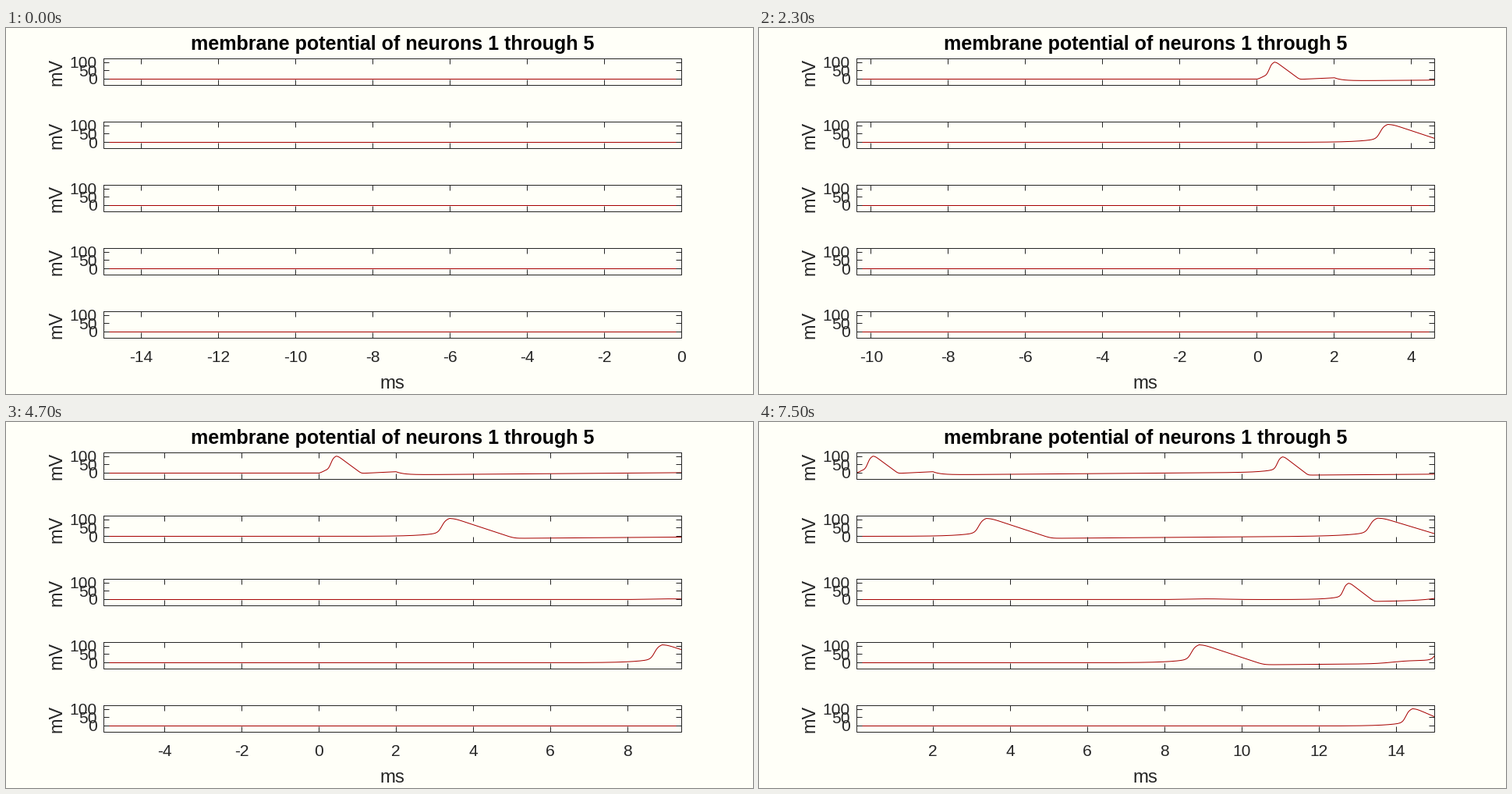
Animation, 958 px wide and 469 px high, one loop 7600 ms. Source, as a matplotlib script:

```python
import math

import numpy as np
import matplotlib.pyplot as plt
from matplotlib.animation import FuncAnimation

W, H, DPI = 958, 469, 64
FRAMES, INTERVAL = 76, 100
STEP, SPAN = 0.2, 14.97          # ms per frame, ms in view
LEFT, RIGHT = 125.5, 866.5
TOPS = [39.5 + 81 * i for i in range(5)]
HEIGHT, V_MAX, V_MIN = 34, 120, -40
X_SCALE = (RIGHT - LEFT) / SPAN
Y_SCALE = HEIGHT / (V_MAX - V_MIN)
TROUGH, RECOVERY = -12, 1.75     # mV, mV per ms
BG, INK, RED = "#fffff8", "#262626", "#a60000"
FONT = "Liberation Sans"


def soft_ramp(x, soft=.04):
    """Ramp from 1 down to 0 with rounded corners."""
    y = 1.07 - 1.12 * x
    return soft * (np.logaddexp(0, y / soft) - np.logaddexp(0, (y - 1) / soft))


def add_spike(v, t, peak, width):
    """Slow foot and steep upstroke, then repolarise and drift back."""
    u = t - peak
    top = 92 + 9.5 * width
    w = .025 + .015 * width
    foot = .32 * np.exp(np.minimum(u, 0) / (10 * w))
    upstroke = .69 * (1 + np.tanh((u + 4 * w) / (2 * w))) / 2
    before = v + (top - v) * (foot + upstroke)
    after = (TROUGH + (top - TROUGH) * soft_ramp(u / width)
             + RECOVERY * np.maximum(u - width, 0))
    return np.where(u < 0, before, after)


def stimulus(t):
    return np.where(t < 2, 9.5 * np.maximum(t, 0),
                    19 * np.exp(-np.maximum(t - 2, 0) / .2))


def bump(t, size, mid, width):
    return size * np.exp(-((t - mid) / width) ** 2)


# Spikes as (peak time, width) in ms
SPIKES = [
    [(.45, .68), (11.06, .69)],
    [(3.39, 1.75), (13.53, 1.95)],
    [(12.77, .69), (15.45, 1.75)],
    [(8.9, 1.75), (15.25, 1.75)],
    [(14.43, 1.3)],
]


def potential(n, t):
    v = np.zeros_like(t)
    for peak, width in SPIKES[n]:
        v = add_spike(v, t, peak, width)
    if n == 0:
        v = v * np.clip(t / .15, 0, 1) + stimulus(t)
    elif n == 2:
        v = v + bump(t, 4, 9.1, .7)
    elif n == 3:
        v = v + bump(t, 11, 14.3, .6)
    return v


def px(n):
    return n * 72 / DPI


def snap(p):
    return math.floor(p + 1e-6) + .5


fig = plt.figure(figsize=(W / DPI, H / DPI), dpi=DPI, facecolor=BG)
ax = fig.add_axes([0, 0, 1, 1])
ax.set(xlim=(0, W), ylim=(H, 0))
ax.axis("off")


def line(x, y, color=INK, z=3):
    return ax.plot(x, y, color=color, lw=px(1), zorder=z, snap=False,
                   solid_capstyle="butt", solid_joinstyle="miter")[0]


def label(x, y, text, size, ha="center", **kw):
    kw = {"color": INK, **kw}
    return ax.text(x, y, text, fontsize=px(size), ha=ha, va="baseline",
                   family=FONT, **kw)


label(496, 28, "membrane potential of neurons 1 through 5", 25,
      color="black", weight="bold")
label(495.5, 462, "ms", 24)

grid_x = np.arange(LEFT, RIGHT + .1, .5)
zeros, traces = [], []
for top in TOPS:
    bottom = top + HEIGHT
    zero = snap(top + V_MAX * Y_SCALE)
    zeros.append(zero)
    line([LEFT, RIGHT, RIGHT, LEFT, LEFT, RIGHT],
         [top, top, bottom, bottom, top, top])
    for v in (0, 50, 100):
        y = zero - v * Y_SCALE
        for x0, x1 in ((LEFT, LEFT + 7), (RIGHT - 7, RIGHT)):
            line([x0, x1], [snap(y)] * 2)
        label(117, y + 7, str(v), 21, ha="right")
    label(71, top + HEIGHT / 2, "mV", 23.5, rotation=90,
          rotation_mode="anchor")
    traces.append(line([], [], RED, 2))

ticks = line([], [])
names = [label(0, 428.5, "", 21) for _ in range(8)]


def draw(frame):
    right = round(frame * STEP, 6)
    left = right - SPAN
    t = left + (grid_x - LEFT) / X_SCALE
    for n, (trace, zero) in enumerate(zip(traces, zeros)):
        trace.set_data(grid_x, zero - potential(n, t) * Y_SCALE)

    values = range(2 * math.ceil(left / 2), math.floor(right) + 1, 2)
    xs, ys = [], []
    for name in names:
        name.set_text("")
    for name, value in zip(names, values):
        x = RIGHT - (right - value) * X_SCALE
        name.set_text(str(value))
        name.set_x(x)
        for top in TOPS:
            bottom = top + HEIGHT
            xs += [snap(x)] * 2 + [np.nan] + [snap(x)] * 2 + [np.nan]
            ys += [top, top + 7, np.nan, bottom - 7, bottom, np.nan]
    ticks.set_data(xs, ys)
    return traces + [ticks] + names


anim = FuncAnimation(fig, draw, frames=FRAMES, interval=INTERVAL,
                     repeat=True, repeat_delay=0, blit=False)
plt.show()
```
